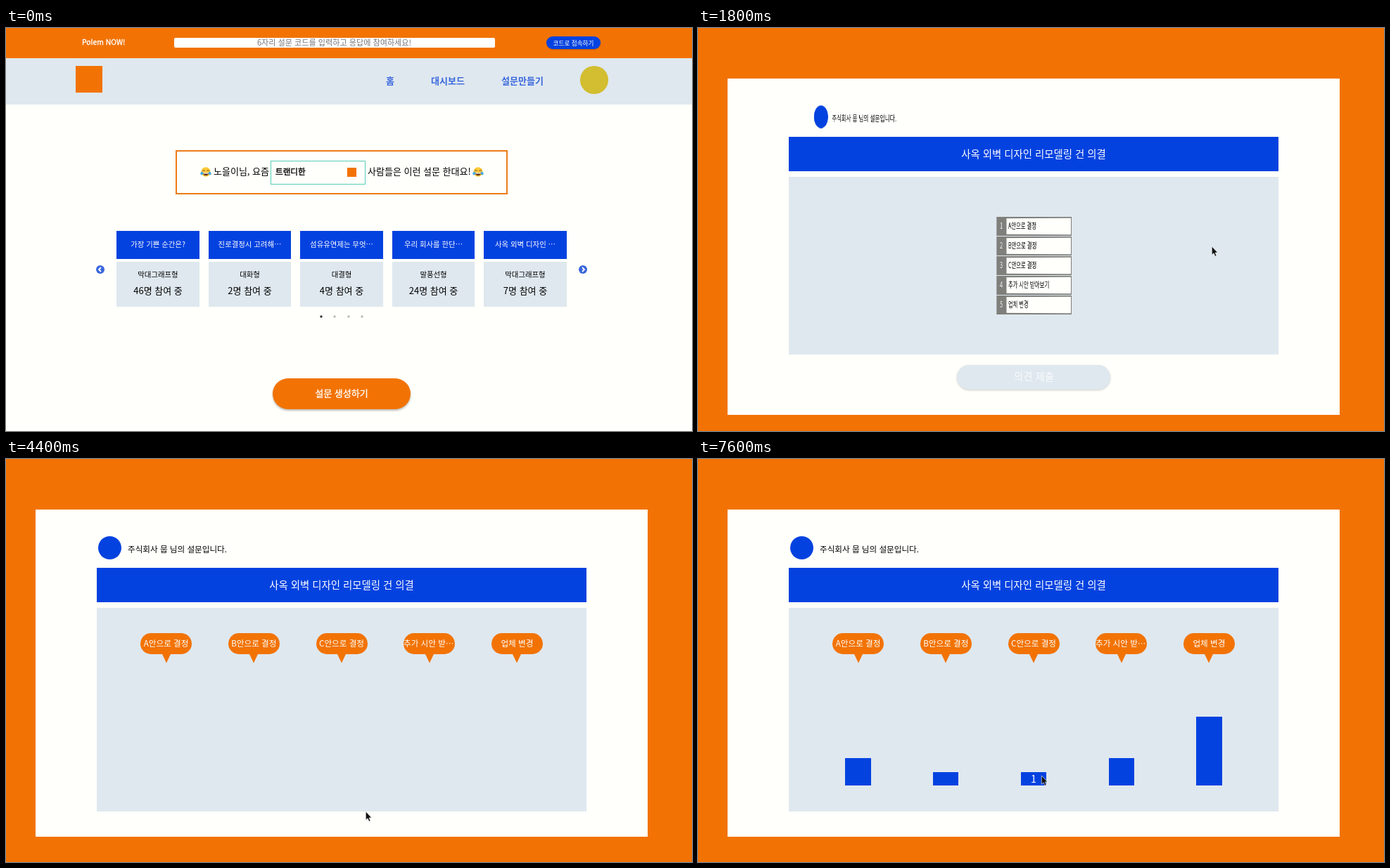
Recreate the animation shown at these times as an HTML page. Size 975 by 574 pixels, loop 8 s.

```html
<!DOCTYPE html>
<html lang="ko">
<head>
<meta charset="utf-8">
<title>설문</title>
<style>
  html, body { margin: 0; width: 100%; height: 100%; overflow: hidden; background: #fffffb; }
  body { position: relative; font-family: "Noto Sans CJK KR", "Noto Sans KR", "Noto Sans CJK JP", "Noto Sans", sans-serif; }
  div, svg { position: absolute; box-sizing: border-box; }
  svg { overflow: visible; }
  .label { white-space: nowrap; line-height: 20px; text-align: center; }
</style>
</head>
<body>
<script>
const ORANGE = '#f27304', BLUE = '#0442e0', LINK = '#3a67dc';
const PALE = '#dfe8ef', PAPER = '#fffffb', GRAY = '#7f7f7b';
const MEDIUM = '-webkit-text-stroke:.35px';
const LOOP = 8000, STEP = 100;

function box(parent, x, y, w, h, css = '') {
  const node = document.createElement('div');
  node.style.cssText = `left:${x}px;top:${y}px;width:${w}px;height:${h}px;${css}`;
  return parent.appendChild(node);
}

// Text placed by the visual centre of its line.
function label(parent, x, y, size, color, text, css = '') {
  const node = box(parent, x - 200, y - 10 - size * .05, 400, 20, `font-size:${size}px;color:${color};${css}`);
  node.className = 'label';
  node.textContent = text;
  return node;
}

const leftLabel = (parent, x, y, size, color, text, css = '') =>
  label(parent, x + 200, y, size, color, text, 'text-align:left;' + css);

function drawing(parent, x, y, shapes) {
  parent.insertAdjacentHTML('beforeend',
    `<svg width="1" height="1" style="left:${x}px;top:${y}px">${shapes}</svg>`);
  return parent.lastElementChild;
}

const scene = css => box(document.body, 0, 0, 975, 574, css);
const fill = color => `background:${color};`;

// Home page
const home = scene();
box(home, 0, 0, 975, 43, fill(ORANGE));
leftLabel(home, 108, 21, 10.4, '#fff', 'Polem NOW!', MEDIUM);
box(home, 239, 14, 456, 14, fill('#fff') + 'border-radius:2px');
label(home, 466.5, 20.5, 11.1, '#757575', '6자리 설문 코드를 입력하고 응답에 참여하세요!');
box(home, 768, 12, 77, 18, fill(BLUE) + 'border-radius:10px;box-shadow:0 1px 2px #0003');
label(home, 806.5, 21.5, 8.6, '#fff', '코드로 접속하기');

box(home, 0, 43, 975, 66, fill(PALE));
box(home, 99, 54, 38, 38, fill(ORANGE));
[[546, '홈'], [628, '대시보드'], [734, '설문만들기']].forEach(([x, text]) =>
  label(home, x, 76, 13, LINK, text, 'font-weight:700'));
box(home, 816, 54, 39.5, 39.5, fill('#d3bd30') + 'border-radius:50%');

box(home, 241, 174, 472, 63, 'border:2px solid #ec7c17');
box(home, 376, 189, 135, 33.5, 'border:1px solid #55cdb5');
leftLabel(home, 295, 204.5, 13, '#000', '노을이님, 요즘');
leftLabel(home, 383, 205, 11.6, '#000', '트랜디한', MEDIUM);
box(home, 485, 199, 13, 13, fill(ORANGE));
leftLabel(home, 514, 204.5, 13, '#000', '사람들은 이런 설문 한대요!');
for (const x of [284, 670.5]) {
  drawing(home, x, 204.5, `<g transform="scale(.95)">
    <circle r="7" fill="#fcc938"/>
    <path d="M-4.6 1H4.6C4.2 7 -4.2 7 -4.6 1Z" fill="#6b3d20"/>
    <path d="M-4 1.2H4V2.6H-4Z" fill="#fff"/>
    <path d="M-5 -1.5Q-3.3 -4 -1.6 -1.5M1.6 -1.5Q3.3 -4 5 -1.5" fill="none" stroke="#6b3d20"/>
    <g fill="#42a9e8"><ellipse cx="-6" cy="2.2" rx="1.9" ry="2.6" transform="rotate(25 -6 2.2)"/>
    <ellipse cx="6" cy="2.2" rx="1.9" ry="2.6" transform="rotate(-25 6 2.2)"/></g></g>`);
}

[
  ['가장 기쁜 순간은?', '막대그래프형', 46],
  ['진로결정시 고려해⋯', '대화형', 2],
  ['섬유유연제는 무엇⋯', '대결형', 4],
  ['우리 회사를 한단⋯', '말풍선형', 24],
  ['사옥 외벽 디자인 ⋯', '막대그래프형', 7],
].forEach(([title, kind, count], i) => {
  const x = 157 + 130.5 * i, middle = x + 59;
  box(home, x, 289, 117.5, 40, fill(BLUE));
  box(home, x, 333, 117.5, 64, fill(PALE));
  label(home, middle, 308.5, 10.4, '#fff', title);
  label(home, middle, 352, 10.4, '#000', kind);
  label(home, middle, 375, 13, '#000', `${count}명 참여 중`);
});
[[134, 1], [820, -1]].forEach(([x, side]) => drawing(home, x, 344, `
  <circle r="6" fill="${LINK}"/>
  <path d="M${side} -3L${-2 * side} 0L${side} 3" fill="none" stroke="#fff" stroke-width="1.8"/>`));
for (let i = 0; i < 4; i++) {
  drawing(home, 447.5 + 19.6 * i, 410.5, `<circle r="1.7" opacity="${i ? .28 : .8}"/>`);
}
box(home, 379, 499, 196, 44, fill(ORANGE) + 'border-radius:22px;box-shadow:0 2px 3px #0004');
label(home, 477, 520.5, 13, '#fff', '설문 생성하기', MEDIUM);

// Survey page
const survey = scene(fill(ORANGE));
const card = box(survey, 42, 72, 870, 479, fill(PAPER));
const author = box(survey, 129, 109, 183, 34);
box(author, 1.5, .5, 33.5, 33.5, fill(BLUE) + 'border-radius:50%');
leftLabel(author, 44, 20, 11.6, '#000', '주식회사 뭅 님의 설문입니다.');
box(survey, 129, 155, 696, 49, fill(BLUE));
label(survey, 477, 179.5, 14.4, '#fff', '사옥 외벽 디자인 리모델링 건 의결');
const panel = box(survey, 129, 212, 696, 253, fill(PALE));

const vote = box(survey, 0, 0, 975, 574);
const rows = ['A안으로 결정', 'B안으로 결정', 'C안으로 결정', '추가 시안 받아보기', '업체 변경'].map((text, i) => {
  const row = box(vote, 393, 269.4 + 27.9 * i, 167, 26.6, `border:2px solid;${fill(PAPER)}`);
  row.tag = box(row, -2, -2, 23, 26.6);
  label(row, 9, 11, 11.6, '#fff', i + 1);
  leftLabel(row, 25, 11, 11.6, '#000', text);
  return row;
});
const submit = box(vote, 368, 480, 218, 35, 'border-radius:18px;box-shadow:0 1px 3px #0003');
const submitText = label(vote, 477.5, 497, 14.4, '#fff', '의견 제출');

const result = box(survey, 0, 0, 975, 574);
const FLOOR = 465.3, UNIT = 19.75;
const bars = [
  ['A안으로 결정', 2], ['B안으로 결정', 1], ['C안으로 결정', 1], ['추가 시안 받⋯', 2], ['업체 변경', 5],
].map(([text, votes], i) => {
  const x = 227.6 + 124.7 * i;
  box(result, x - 36.5, 248, 73, 30, fill(ORANGE) + 'border-radius:15px');
  drawing(result, x, 277.5, `<path d="M-6 0H6L0 12.5Z" fill="${ORANGE}"/>`);
  label(result, x - (i === 3 ? 1 : 0), 262.5, 11.6, '#fff', text);
  const node = box(result, x - 18.2, FLOOR, 36.4, 0, fill(BLUE));
  const count = label(result, x, FLOOR - votes * UNIT / 2, 14.4, '#fff', votes);
  return { x, votes, node, count };
});

const cursor = drawing(document.body, 0, 0,
  '<path d="M.3 0V12.2L3 9.8L5 14.2L7 13.4L5.1 9H8.6Z" fill="#111" stroke="#fff" stroke-opacity=".75" stroke-width=".8"/>');

// Pointer stops: time, x, y
const trail = [
  [400, 741, 549], [500, 741, 549], [600, 743, 530], [700, 741, 430], [800, 735, 340], [900, 731, 311],
  [1500, 731, 311], [1600, 730, 311], [2200, 730, 311], [3000, 518, 400], [3600, 518, 400],
  [4100, 511, 502], [5300, 511, 502], [6000, 735, 447], [6200, 735, 447], [7000, 605, 447],
  [7200, 605, 447], [7400, 519, 449], [7500, 519, 449], [7600, 488, 451], [LOOP, 488, 451],
];

function pointerAt(t) {
  const next = Math.max(1, trail.findIndex(stop => stop[0] > t));
  const [t0, x0, y0] = trail[next - 1], [t1, x1, y1] = trail[next];
  const p = Math.max(0, (t - t0) / (t1 - t0));
  return [x0 + (x1 - x0) * p, y0 + (y1 - y0) * p];
}

// cubic-bezier(.25, .1, .25, 1)
function ease(x) {
  if (x <= 0 || x >= 1) return x <= 0 ? 0 : 1;
  const curve = (a, b, u) => 3 * a * u * (1 - u) ** 2 + 3 * b * u * u * (1 - u) + u ** 3;
  let low = 0, high = 1;
  for (let i = 0; i < 20; i++) {
    const u = (low + high) / 2;
    if (curve(.25, .25, u) < x) low = u; else high = u;
  }
  return curve(.1, 1, low);
}

const show = (node, visible) => node.style.display = visible ? '' : 'none';

function render(t) {
  const [px, py] = pointerAt(t);
  show(cursor, t >= 400);
  cursor.style.left = px + 'px';
  cursor.style.top = py + 'px';

  const voted = t >= 3400, closed = t >= 4400;
  show(home, t < 1300);
  show(survey, t >= 1600);
  show(vote, !closed);
  show(result, closed);
  card.style.height = (closed ? 466 : 479) + 'px';
  panel.style.height = (closed ? 289.5 : 253) + 'px';

  const angle = -100 * (1 - ease((t - 1610) / 650));
  const flip = angle ? `perspective(2500px) rotateY(${angle}deg)` : 'none';
  for (const node of [author, ...rows]) {
    node.style.transform = flip;
    node.style.visibility = angle < -90 ? 'hidden' : '';
  }
  rows.forEach((row, i) => {
    const chosen = voted && i === 4;
    row.style.borderColor = row.tag.style.background = chosen ? ORANGE : GRAY;
    if (i === 4 && t >= 3000 && t < 3800) row.style.transform = 'translateX(1.4px)';
  });
  submit.style.background = voted ? BLUE : PALE;
  submitText.style.opacity = voted ? 1 : .8;

  const grown = ease((t - 4400) / 1000);
  for (const bar of bars) {
    const height = bar.votes * UNIT * grown;
    bar.node.style.top = FLOOR - height + 'px';
    bar.node.style.height = height + 'px';
    show(bar.count, Math.abs(px - bar.x) < 18.2 && py < FLOOR && py > FLOOR - height);
  }
}

function tick() {
  const t = performance.now() % LOOP;
  render(Math.floor(t / STEP) * STEP);
  requestAnimationFrame(tick);
}
tick();
</script>
</body>
</html>
```
